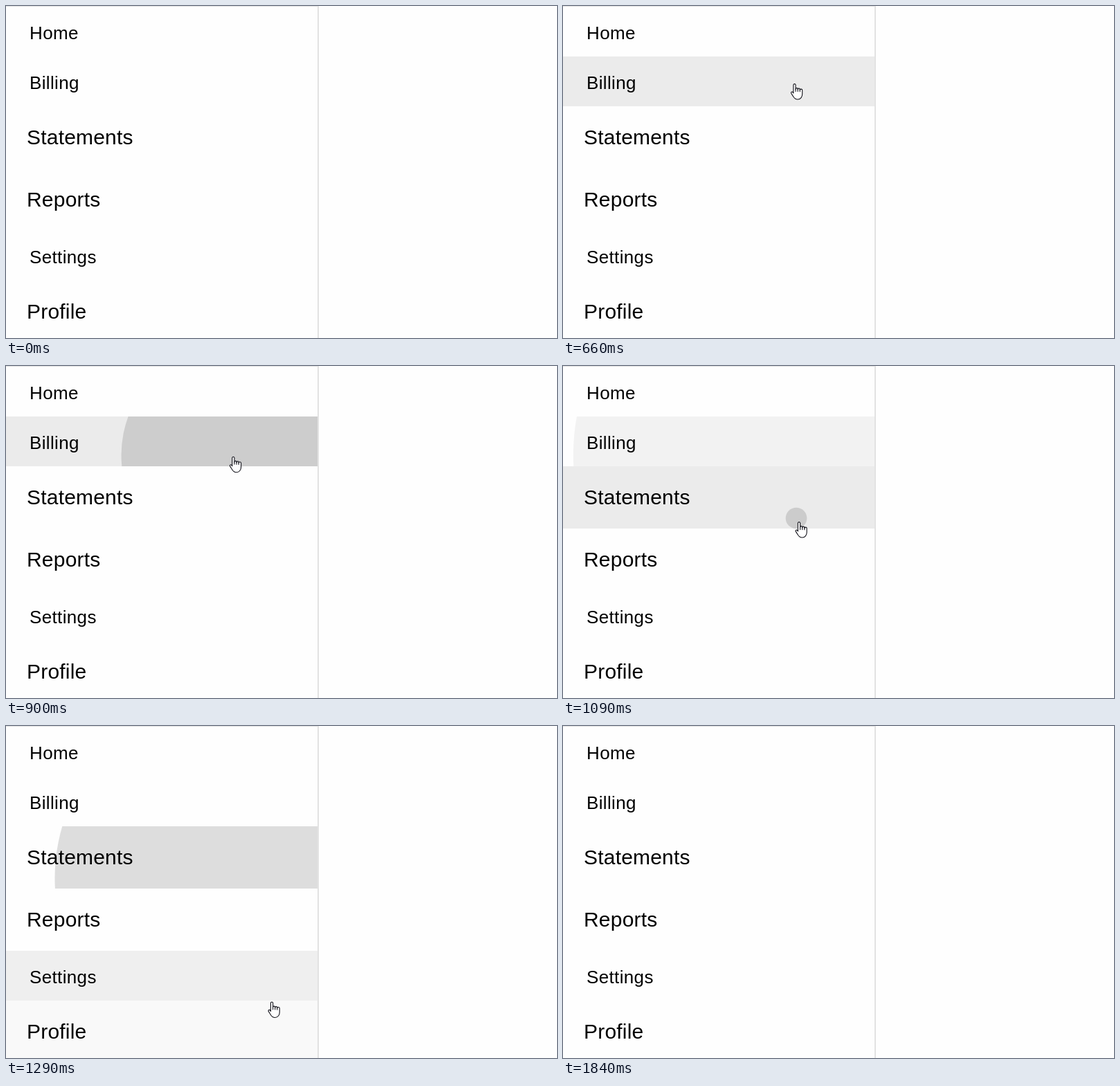
Recreate the animation shown at these times as an HTML page. Size 796x480 px, loop 3200 ms.

```html
<!DOCTYPE html>
<html lang="en">
<head>
<meta charset="utf-8">
<title>Menu with ripples</title>
<style>
  html, body { margin: 0; width: 100%; height: 100%; overflow: hidden; background: #fefefe; }
  #stage { display: block; width: 796px; height: 480px; }
  text { font-family: "Liberation Sans", Arial, sans-serif; font-size: 30px; letter-spacing: .2px; }
  .dense text { font-size: 26px; letter-spacing: .35px; }
  .line { fill: #e2e2e2; }
  #pointer { fill: #fff; stroke: #101018; stroke-width: 1.1; stroke-linejoin: round; stroke-linecap: round; }
</style>
</head>
<body>
<svg id="stage" viewBox="0 0 796 480">
  <g id="menu"></g>
  <rect class="line" width="452" height="1"/>
  <rect class="line" x="450" width="2" height="480"/>
  <g id="pointer">
    <g id="hand">
      <path d="M-1.6 13V1.2a1.6 1.6 0 0 1 3.2 0V7.4a1.5 1.5 0 0 1 3.1-.4v.8a1.5 1.5 0 0 1 3.1-.2v1a1.6 1.6 0 0 1 3.4.4V14.5C11.2 18 9 22 4.5 22C0 22-.6 19.6-2.6 16.6L-4.9 12.9C-5.4 11.2-3.4 10.4-2.5 11.6Z"/>
      <path d="M1.6 7V10.4M4.7 7.4V10.6M7.8 8V10.8"/>
    </g>
    <path id="arrow" d="M0 0V17L4 13.2L6.7 19.2L9.2 18.1L6.5 12.3H12Z"/>
  </g>
</svg>
<script>
const LOOP = 3200;
const MENU_WIDTH = 450;
const ENTER = 30, EXIT = 1840;
const HOVER_FADE = 75, HOVER_ALPHA = .075;
const RIPPLE_GROW = 400, RIPPLE_ALPHA = .13;

const byId = id => document.getElementById(id);
const clamp = x => Math.min(1, Math.max(0, x));
const smooth = x => x * x * (3 - 2 * x);
const mix = (a, b, k) => a + (b - a) * k;

// Pointer stops: ms, x, y.
const stops = [
  [ENTER, 262, 425], [380, 358, 55], [430, 358, 55], [760, 328, 129], [880, 328, 129],
  [1090, 341, 226], [1280, 384, 399], [1430, 386, 428], [1470, 384, 349],
  [1690, 433, 347], [1790, 488, 461]
];
const clicks = {
  Billing: { start: 788, x: 328, y: 129 },
  Statements: { start: 1082, x: 337, y: 220 }
};

let nextTop = 1;
const rows = ['Home', 'Billing', 'Statements', 'Reports', 'Settings', 'Profile'].map(name => {
  const dense = ['Home', 'Billing', 'Settings'].includes(name);
  const height = dense ? 72 : 90;
  const row = { name, dense, height, top: nextTop, click: clicks[name] };
  nextTop += height;
  return row;
});

byId('menu').innerHTML = rows.map(({ name, dense, height, top, click }) => `
  <svg class="${dense ? 'dense' : ''}" y="${top}" width="${MENU_WIDTH}" height="${height}">
    <rect id="${name}" width="100%" height="100%"/>
    ${click ? `<circle id="${name}Ripple" cx="${click.x}" cy="${click.y - top}"/>` : ''}
    <text x="${dense ? 34 : 30}" y="${dense ? 47 : 55}">${name}</text>
  </svg>`).join('');

function pointerAt(t) {
  const i = stops.findIndex(([ms]) => ms > t);
  if (i <= 0) return i ? stops[stops.length - 1].slice(1) : stops[0].slice(1);
  const [t0, x0, y0] = stops[i - 1], [t1, x1, y1] = stops[i];
  const k = smooth((t - t0) / (t1 - t0));
  return [mix(x0, x1, k), mix(y0, y1, k)];
}

function isOver(row, t) {
  const [x, y] = pointerAt(t);
  return t >= ENTER && x < MENU_WIDTH && y >= row.top && y < row.top + row.height;
}

// Share of the last HOVER_FADE ms that the pointer spent over the row.
function hoverLevel(row, t) {
  const samples = 25;
  let hits = 0;
  for (let i = 0; i < samples; i++) hits += isOver(row, t - HOVER_FADE * i / samples);
  return smooth(hits / samples);
}

function drawRipple({ name, top, height, click }, t) {
  const age = t - click.start;
  const reach = Math.hypot(click.x, Math.max(click.y - top, top + height - click.y));
  const circle = byId(name + 'Ripple');
  circle.setAttribute('r', reach * (1 - (1 - clamp(age / RIPPLE_GROW)) ** 2));
  circle.setAttribute('opacity', RIPPLE_ALPHA * clamp((350 - age) / 130));
}

function draw(t) {
  for (const row of rows) {
    byId(row.name).setAttribute('opacity', HOVER_ALPHA * hoverLevel(row, t));
    if (row.click) drawRipple(row, t);
  }
  const [x, y] = pointerAt(t);
  const shown = t >= ENTER && t < EXIT;
  byId('pointer').setAttribute('transform', `translate(${x} ${y})`);
  byId('hand').setAttribute('opacity', shown && x < MENU_WIDTH ? 1 : 0);
  byId('arrow').setAttribute('opacity', shown && x >= MENU_WIDTH ? 1 : 0);
}

const start = performance.now();
function tick() {
  draw((performance.now() - start) % LOOP);
  requestAnimationFrame(tick);
}
tick();
</script>
</body>
</html>
```
